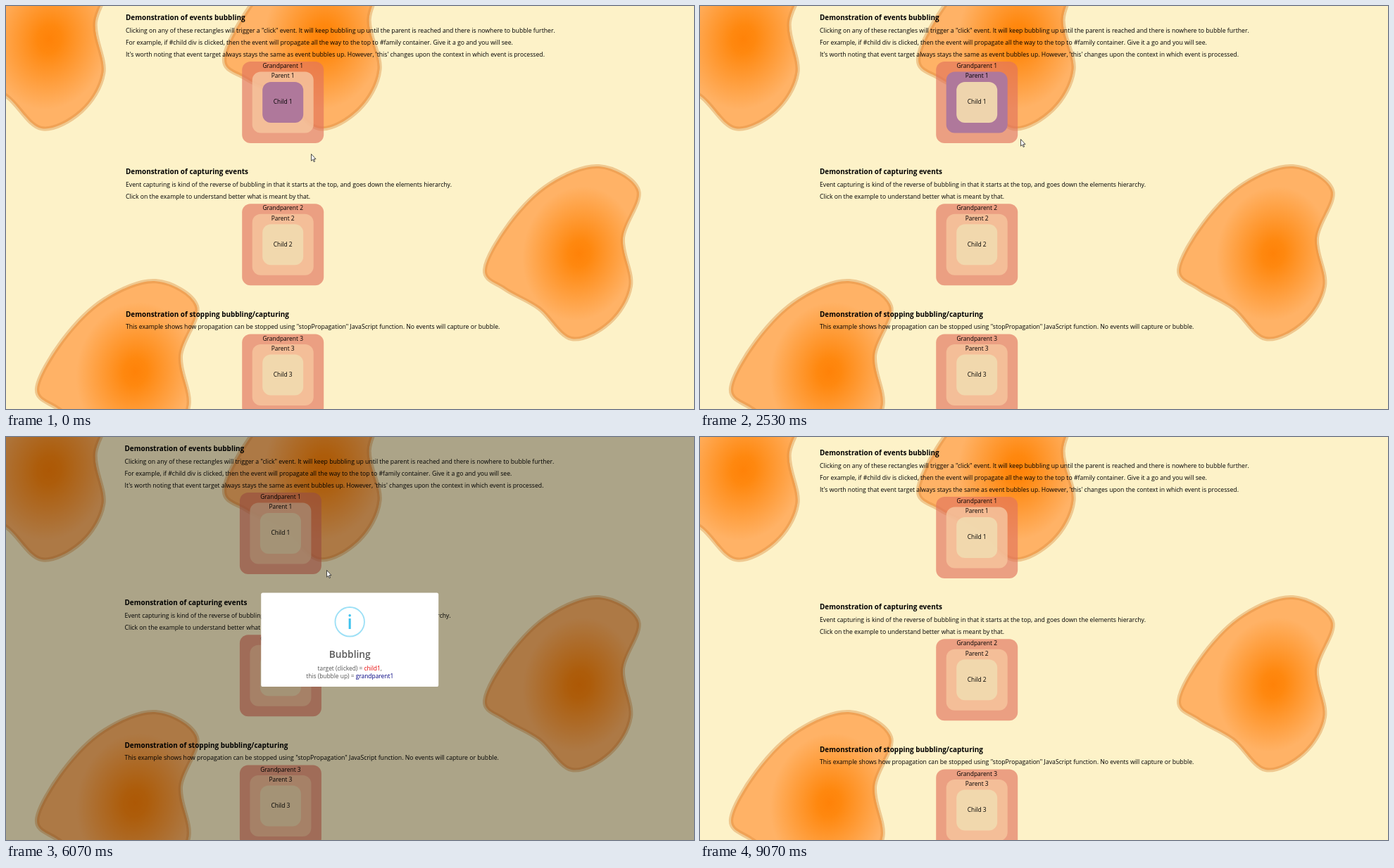
Animation, 977 px wide and 573 px high, one loop 9.67 s. Source, as an HTML page with a canvas:

```html
<!DOCTYPE html>
<html lang="en">
<head>
<meta charset="utf-8">
<title>Event propagation demo</title>
<style>
html, body { margin: 0; width: 100%; height: 100%; overflow: hidden; background: #fdf2c8; }
canvas { display: block; width: 977px; height: 573px; }
</style>
</head>
<body>
<canvas id="stage" width="977" height="573"></canvas>
<script>
const W = 977, H = 573, LOOP = 9670;
const ctx = document.getElementById('stage').getContext('2d');
const FONT = '"Open Sans", "Noto Sans", sans-serif';

const clamp = v => Math.max(0, Math.min(1, v));
const mix = (a, b, k) => a + (b - a) * k;

// CSS "ease": cubic-bezier(.25, .1, .25, 1)
function ease(x) {
  x = clamp(x);
  let lo = 0, hi = 1;
  for (let i = 0; i < 22; i++) {
    const u = (lo + hi) / 2, v = 1 - u;
    if (0.75 * v * v * u + 0.75 * v * u * u + u * u * u < x) lo = u; else hi = u;
  }
  const v = 1 - lo;
  return 0.3 * v * v * lo + 3 * v * lo * lo + lo ** 3;
}

// ---- background blobs: one outline, relative to its lowest point ----
const OUTLINE = [
  [-123, -98], [-88, -164], [-31, -220], [39, -245], [95, -211], [73, -143],
  [84, -75], [54, -23], [0, 0], [-46, -43], [-95, -71]
];
const BLOBS = [
  { x: 50, y: 174, scale: 1.05, turn: 0 },
  { x: 445, y: 174, scale: 1.06, turn: -0.045 },
  { x: 803, y: 473, scale: 1, turn: 0 },
  { x: 172, y: 646, scale: 1.04, turn: 0 }
];

// closed Catmull-Rom curve
function smoothPath(pts) {
  const n = pts.length, at = i => pts[(i + n) % n], path = new Path2D();
  path.moveTo(...pts[0]);
  for (let i = 0; i < n; i++) {
    const [a, b, c, d] = [at(i - 1), at(i), at(i + 1), at(i + 2)];
    path.bezierCurveTo(
      b[0] + (c[0] - a[0]) / 6, b[1] + (c[1] - a[1]) / 6,
      c[0] - (d[0] - b[0]) / 6, c[1] - (d[1] - b[1]) / 6, c[0], c[1]);
  }
  path.closePath();
  return path;
}
const blobPath = smoothPath(OUTLINE);

function drawBlob({ x, y, scale, turn }) {
  ctx.save();
  ctx.translate(x, y);
  ctx.rotate(turn);
  ctx.scale(scale, scale);
  ctx.fillStyle = '#ffb266';
  ctx.fill(blobPath);

  ctx.save();
  ctx.clip(blobPath);
  ctx.translate(11, -121);
  ctx.rotate(0.2);
  ctx.scale(1, 1.2);
  const glow = ctx.createRadialGradient(0, 0, 0, 0, 0, 80);
  glow.addColorStop(0, '#ff8208');
  glow.addColorStop(0.2, '#ff880f');
  glow.addColorStop(1, '#ffb266');
  ctx.fillStyle = glow;
  ctx.fillRect(-90, -90, 180, 180);
  ctx.restore();

  ctx.strokeStyle = 'rgba(218,138,62,.41)';
  ctx.lineWidth = 6;
  ctx.stroke(blobPath);
  ctx.restore();
}

// ---- page ----
const SECTIONS = [
  ['Demonstration of events bubbling',
    'Clicking on any of these rectangles will trigger a "click" event. It will keep bubbling up until the parent is reached and there is nowhere to bubble further.',
    'For example, if #child div is clicked, then the event will propagate all the way to the top to #family container. Give it a go and you will see.',
    "It's worth noting that event target always stays the same as event bubbles up. However, 'this' changes upon the context in which event is processed."],
  ['Demonstration of capturing events',
    'Event capturing is kind of the reverse of bubbling in that it starts at the top, and goes down the elements hierarchy.',
    'Click on the example to understand better what is meant by that.'],
  ['Demonstration of stopping bubbling/capturing',
    'This example shows how propagation can be stopped using "stopPropagation" JavaScript function. No events will capture or bubble.']
];
const FAMILY = [
  { name: 'Grandparent', fill: 'rgba(226,116,93,.65)' },
  { name: 'Parent', fill: 'rgba(246,196,157,.85)' },
  { name: 'Child', fill: 'rgba(242,218,174,.95)' }
];
const PURPLE = '#af789b', BOX = 116, STEP = 14.5, LINE = 16.9;

function text(str, x, y, size, color = '#000', weight = 500, align = 'left') {
  ctx.font = `${weight} ${size}px ${FONT}`;
  ctx.fillStyle = color;
  ctx.textAlign = align;
  ctx.fillText(str, x, y);
}

function panel(x, y, w, h, r, fill) {
  ctx.beginPath();
  ctx.roundRect(x, y, w, h, r);
  ctx.fillStyle = fill;
  ctx.fill();
}

function drawFamily(x, y, number, lit) {
  FAMILY.forEach(({ name, fill }, level) => {
    const inset = STEP * level, side = BOX - 2 * inset;
    panel(x + inset, y + inset, side, side, 12, level === lit ? PURPLE : fill);
    const base = name === 'Child' ? BOX / 2 + 2.5 : inset + 9;
    text(`${name} ${number}`, x + BOX / 2, y + base, 8.45, '#000', 500, 'center');
  });
}

// the layout moves a little while a popup hides the scrollbar
function drawPage(shifted, lit, scroll) {
  const textX = shifted ? 168.5 : 170;
  const boxX = shifted ? 331.9 : 335.2;
  let y = 20 + scroll;
  SECTIONS.forEach(([title, ...lines], n) => {
    text(title, textX, y, 9.95, '#000', 700);
    y += 0.9;
    for (const line of lines) text(line, textX, y += LINE, 8.68);
    y += 7.3;
    drawFamily(boxX, y, n + 1, n === 0 ? lit : -1);
    y += 160.3;
  });
}

// ---- popups: the click bubbles from child to grandparent ----
const FIRST = 720, EVERY = 2658, STAY = 1600, HIDE = 150, SETTLE = 190;

function showScale(p) {
  if (p < 0.45) return mix(0.7, 1.05, ease(p / 0.45));
  if (p < 0.8) return mix(1.05, 0.95, ease((p - 0.45) / 0.35));
  return mix(0.95, 1, ease((p - 0.8) / 0.2));
}

function pair(label, value, end, y, color) {
  ctx.font = `500 9.9px ${FONT}`;
  const a = ctx.measureText(label).width, b = ctx.measureText(value).width;
  const x = -(a + b + ctx.measureText(end).width) / 2;
  text(label, x, y, 9.9, '#545454');
  text(value, x + a, y, 9.9, color);
  text(end, x + a + b, y, 9.9, '#545454');
}

function drawPopup(name, age) {
  const gone = age - STAY;
  const out = ease(gone / HIDE);
  const dim = ease(age / 70) * (1 - ease(gone / 100));
  ctx.fillStyle = `rgba(0,0,0,${0.4 * dim})`;
  ctx.fillRect(0, 0, W, H);
  if (out >= 1) return;

  const scale = showScale(clamp(age / 300)) * mix(1, 0.5, out);
  ctx.save();
  ctx.globalAlpha = 1 - out;
  ctx.translate(488.2, 288.3);
  ctx.scale(scale, scale);
  panel(-148.2, -78.5, 296.4, 157, 3, '#fff');
  ctx.beginPath();
  ctx.arc(0, -30, 24.4, 0, Math.PI * 2);
  ctx.strokeStyle = '#9de0f6';
  ctx.lineWidth = 2.2;
  ctx.stroke();
  text('i', 0, -17.5, 31, '#3fc3ee', 600, 'center');
  text('Bubbling', 0, 30, 16.2, '#595959', 600, 'center');
  pair('target (clicked) = ', 'child1', ',', 51.6, '#e80808');
  pair('this (bubble up) = ', name, '', 64.6, '#000080');
  ctx.restore();
}

// ---- pointer: each leg runs from the last stop to x, y ----
const LEGS = [
  { from: 110, to: 300, x: 425, y: 197 },
  { from: 300, to: 470, x: 437, y: 209 },
  { from: 720, to: 1260, x: 448, y: 215 },
  { from: 1290, to: 1530, x: 455, y: 189 },
  { from: 7150, to: 7400, x: 414, y: 198 },
  { from: 7590, to: 8270, x: 359, y: 221 },
  { from: 8430, to: 8950, x: -12, y: 330 }
];
const ARROW = new Path2D('M.5 .5V10.2L2.7 8.2L4.2 11.6L5.6 11L4.1 7.6H7Z');

function drawPointer(t) {
  let x = 433, y = 210;
  for (const leg of LEGS) {
    const k = clamp((t - leg.from) / (leg.to - leg.from));
    x = mix(x, leg.x, k);
    y = mix(y, leg.y, k);
  }
  ctx.save();
  ctx.translate(x, y);
  ctx.fillStyle = '#fff';
  ctx.fill(ARROW);
  ctx.strokeStyle = '#222';
  ctx.lineWidth = 0.8;
  ctx.stroke(ARROW);
  ctx.restore();
}

function draw(t) {
  // position in the row of popups; between two of them the next box is lit
  const turn = Math.max(0, Math.floor((t - FIRST) / EVERY));
  const age = t - FIRST - turn * EVERY;
  const open = turn < 3 && age >= 0 && age < STAY + SETTLE;
  const lit = open ? -1 : age < 0 ? 2 : 1 - turn;

  ctx.fillStyle = '#fdf2c8';
  ctx.fillRect(0, 0, W, H);
  BLOBS.forEach(drawBlob);
  drawPage(open, lit, 6 * ease((t - 8480) / 150));
  if (open) drawPopup(`${FAMILY[2 - turn].name.toLowerCase()}1`, age);
  drawPointer(t);
}

const start = performance.now();
function tick() {
  draw((performance.now() - start) % LOOP);
  requestAnimationFrame(tick);
}
tick();
</script>
</body>
</html>
```
